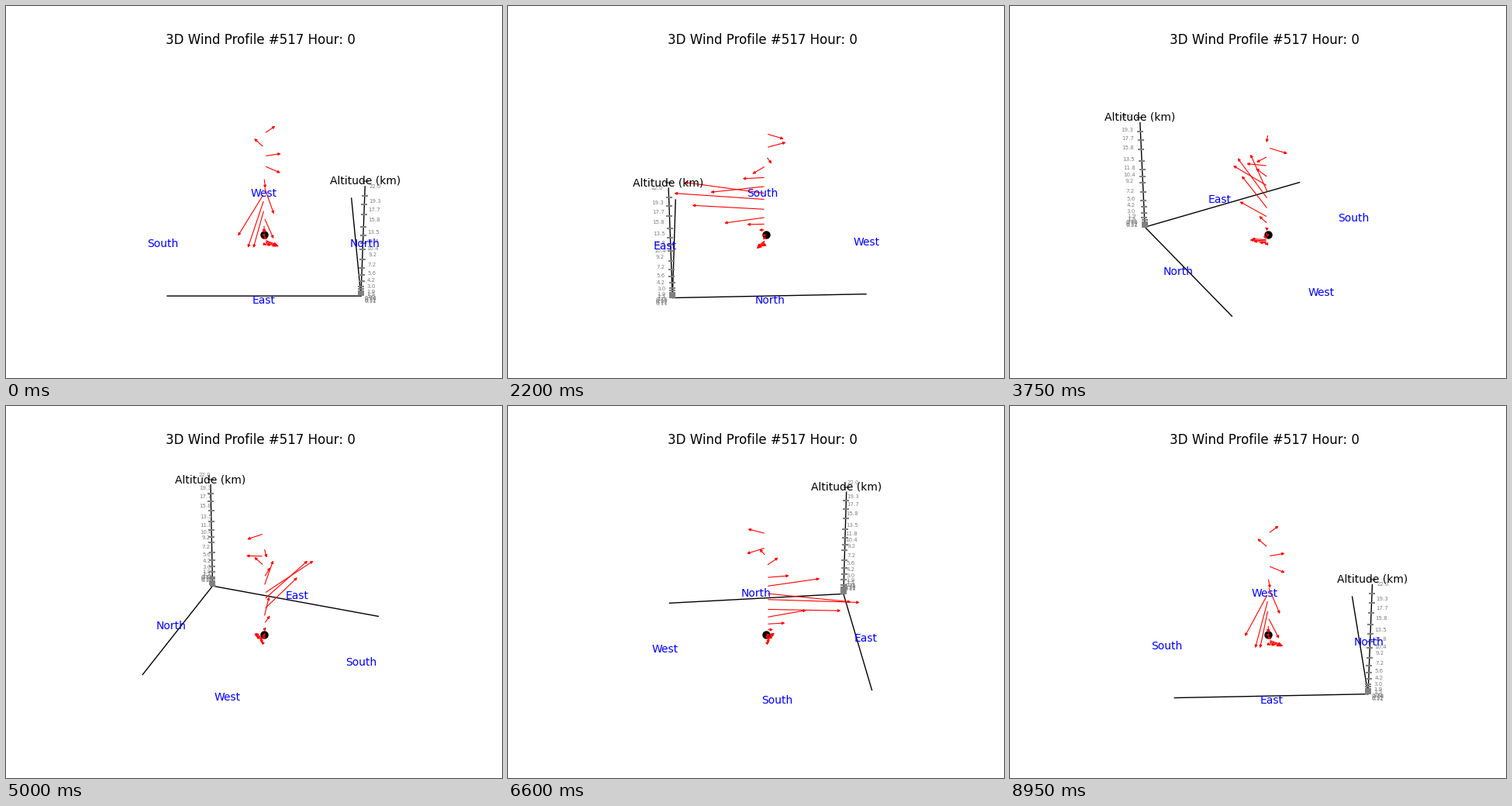
A matplotlib script for the animation above (9 s loop, 640 by 480 pixels).

```python
import numpy as np
import matplotlib.pyplot as plt
from matplotlib.animation import FuncAnimation
from matplotlib.patches import FancyArrowPatch

W, H, FRAMES = 640, 480, 180
CX, CY = 333.0, 237.4          # screen position of the box centre
FOCAL, DIST = 1997.8, 10.0
ELEV = np.radians(30)
EDGE = 0.6057                  # half width of the drawn base
LABEL = 1.1 * EDGE

# pressure levels in hPa, turned to kilometres by the barometric formula
pressure = np.array([*range(1000, 899, -25), 850, *range(800, 300, -100),
                     *range(300, 99, -50), 70, 50, 27.6])
levels = 44.33 * (1 - (pressure / 1013.25) ** 0.1903)
LOW, HIGH = levels[0], levels[-1]


def wind(km):
    """East and north wind: a low gust, a westerly jet and waves aloft."""
    gust = np.exp(-((km - 0.8) / 0.6) ** 2)
    jet = 0.612 * np.exp(-(km - 9) ** 2 / 15.5)
    east = np.interp(km, [13.5, 15.8, 19.3, 22], [0, 0.072, -0.144, -0.121])
    north = np.interp(
        km, [4.2, 5.6, 7.2, 9.2, 10.4, 11.8, 13.5, 15.8, 17.7, 19.3, 22],
        [0, 0.067, -0.071, -0.104, -0.17, 0.07, 0.009, 0.116, 0.122, -0.075, 0.083])
    return 0.07 * gust + jet + east, 0.11 * gust + north


def project(x, y, km, azim):
    """Perspective view of a point, in stage pixels."""
    z = (km - (LOW + HIGH) / 2) * 0.0376
    right = -x * np.sin(azim) + y * np.cos(azim)
    toward = x * np.cos(azim) + y * np.sin(azim)
    depth = toward * np.cos(ELEV) + z * np.sin(ELEV)
    up = z * np.cos(ELEV) - toward * np.sin(ELEV)
    scale = FOCAL / (DIST - depth)
    return CX + right * scale, CY - up * scale


fig = plt.figure(figsize=(W / 100, H / 100), dpi=100, facecolor="white")
ax = fig.add_axes([0, 0, 1, 1])
ax.set_xlim(0, W)
ax.set_ylim(H, 0)
ax.axis("off")


def centred(text, size, color, zorder=6):
    return ax.text(0, 0, text, fontsize=size, color=color,
                   ha="center", va="center", zorder=zorder)


def add_arrow():
    return ax.add_patch(FancyArrowPatch(
        (0, 0), (1, 1), arrowstyle="-|>", color="red", mutation_scale=5,
        lw=0.8, shrinkA=2, shrinkB=2, zorder=4))


ax.text(328, 49.3, "3D Wind Profile #517 Hour: 0", fontsize=12,
        ha="center", va="baseline")
base, = ax.plot([], [], color="black", lw=1, zorder=2)
mast, = ax.plot([], [], color="black", lw=1, zorder=2)
ticks, = ax.plot([], [], ls="none", marker="_", ms=6, mew=1.5,
                 color="gray", zorder=3)
ax.plot(*project(0, 0, 2.0, 0), "o", color="black", ms=6.5, zorder=3)

arrows = [add_arrow() for _ in levels]
tick_labels = [centred(f"{km:.1f}" if km > 0.9 else f"{km:.2f}", 5, "gray", 5)
               for km in levels]
compass = [centred(name, 10, "blue")
           for name in ("East", "North", "West", "South")]
altitude = centred("Altitude (km)", 10, "black")


def update(i):
    azim = np.radians(2 * i)
    ends = EDGE * np.array([-1, 1, 1])
    base.set_data(*project(ends, ends[::-1], 0, azim))
    mast.set_data(*project(EDGE, EDGE, np.array([0, HIGH - 1]), azim))
    ticks.set_data(*project(EDGE, EDGE, levels, azim))
    altitude.set_position(project(EDGE, EDGE, HIGH, azim))
    for km, arrow, label in zip(levels, arrows, tick_labels):
        arrow.set_positions(project(0, 0, km, azim),
                            project(*wind(km), km, azim))
        x, y = project(LABEL, LABEL, km, azim)
        label.set_position((x - 1, y + 0.5))
    for k, label in enumerate(compass):
        turn = k * np.pi / 2
        label.set_position(project(LABEL * np.cos(turn), LABEL * np.sin(turn),
                                   LOW, azim))
    return [base, mast, ticks, altitude, *arrows, *tick_labels, *compass]


anim = FuncAnimation(fig, update, frames=FRAMES, interval=50,
                     repeat=True, repeat_delay=0, blit=False)
plt.show()
```
